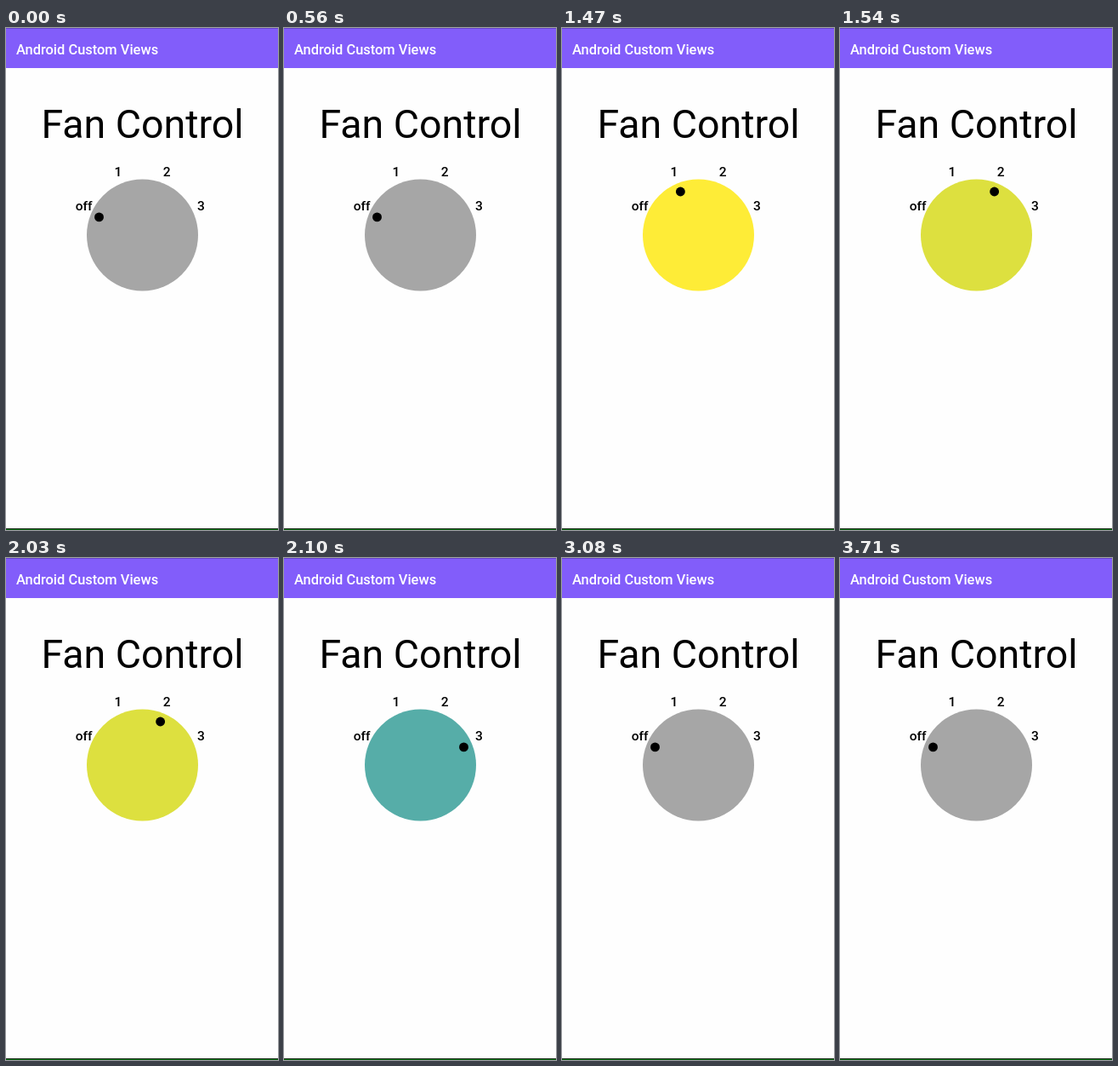
An HTML page with a canvas that plays this animation: 320x589 px, repeating every 3.85 s.

```html
<!DOCTYPE html>
<html lang="en">
<head>
<meta charset="utf-8">
<title>Fan Control</title>
<style>
  html, body { margin: 0; width: 100%; height: 100%; overflow: hidden; background: #fefefe; }
  canvas { display: block; width: 320px; height: 589px; }
</style>
</head>
<body>
<canvas id="stage"></canvas>
<script>
const W = 320, H = 589, LOOP = 3850;
const canvas = document.getElementById('stage');
const ctx = canvas.getContext('2d');
const dpr = window.devicePixelRatio || 1;
canvas.width = W * dpr;
canvas.height = H * dpr;
ctx.scale(dpr, dpr);

const dial = { x: 160.5, y: 243, r: 65.5 };
const labels = ['off', '1', '2', '3'];
const colors = ['#a6a6a6', '#feec37', '#dde03f', '#56ada8'];

// Each tap moves the dial one step on; the last returns it to off.
const taps = [770, 1540, 2100, 3080];

function onDial(step, radius) {
  const a = Math.PI * (9 / 8 + step / 4);
  return [dial.x + radius * Math.cos(a), dial.y + radius * Math.sin(a)];
}

function rect(x, y, w, h, color) {
  ctx.fillStyle = color;
  ctx.fillRect(x, y, w, h);
}

function disc(x, y, r, color) {
  ctx.fillStyle = color;
  ctx.beginPath();
  ctx.arc(x, y, r, 0, Math.PI * 2);
  ctx.fill();
}

function text(str, x, y, size, weight, color, align) {
  ctx.font = `${weight} ${size}px Roboto, Arial, sans-serif`;
  ctx.fillStyle = color;
  ctx.textAlign = align;
  ctx.fillText(str, x, y);
}

function draw(t) {
  const step = taps.filter(tap => t >= tap).length % labels.length;

  rect(0, 0, W, H, '#fefefe');
  rect(0, 0, W, 47, '#825dfa');
  rect(0, 0, W, 1, '#6746c8');
  text('Android Custom Views', 12, 30.7, 16.45, 500, '#fff', 'left');
  text('Fan Control', 160.5, 129, 46.5, 400, '#000', 'center');

  disc(dial.x, dial.y, dial.r, colors[step]);
  labels.forEach((label, i) => {
    const [x, y] = onDial(i, 74.6);
    text(label, x, y, 15.5, 500, '#000', 'center');
  });
  disc(...onDial(step, 55.2), 5.45, '#000');

  rect(0, 587, W, 1, '#1c2a1c');
  rect(0, 588, W, 1, '#0a7014');
}

const start = performance.now();
function tick() {
  draw((performance.now() - start) % LOOP);
  requestAnimationFrame(tick);
}
tick();
</script>
</body>
</html>
```
